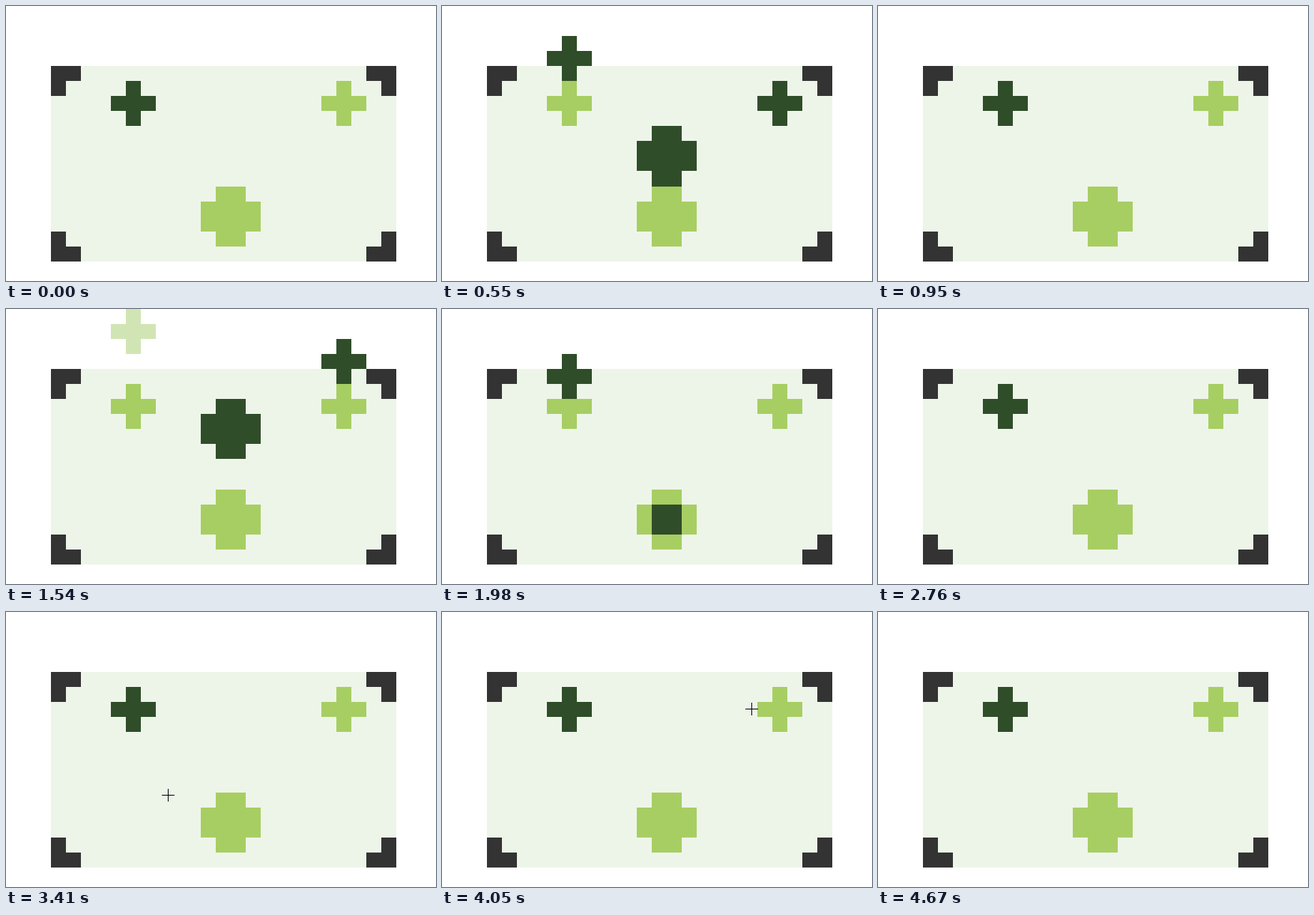
Animation, 574 px wide and 367 px high, one loop 5100 ms. Source, as an HTML page with a canvas:

```html
<!DOCTYPE html>
<html lang="en">
<head>
<meta charset="utf-8">
<title>Floating pluses</title>
<style>
  html, body { margin: 0; width: 100%; height: 100%; overflow: hidden; background: #fff; }
  canvas { display: block; }
</style>
</head>
<body>
<canvas id="stage" width="574" height="367"></canvas>
<script>
const ctx = document.getElementById('stage').getContext('2d');
const LOOP = 5100;
const PANEL = '#edf5e9', CORNER = '#333333';
const DARK = '#304d29', LIGHT = '#a7ce62', PALE = '#d1e5b4';

// Start of each pose, three rounds of eight; every eighth is the rest pose.
const beats = [
  250, 355, 460, 560, 665, 770, 870, 950,
  1120, 1200, 1350, 1450, 1540, 1660, 1750, 1860,
  1980, 2090, 2200, 2310, 2440, 2530, 2670, 2760
];

// Height in cells above home for each pose; null is hidden, 'dot' is the seed.
const sprites = [
  { x: 7, y: 5, size: 3, rise: [0, 2, 3, 3, 3, 5, null, 'dot'], fade: 5 },
  { x: 21, y: 5, size: 3, rise: [null, null, 'dot', 0, 2, 3, 4, null], fade: 6 },
  { x: 13, y: 12, size: 4, rise: [null, 'dot', 0, 4, 5, 6, 7, null], fade: 6 }
];

// Pointer strokes: quadratic curves, advanced in even steps.
const strokes = [
  { from: 3090, to: 3590, steps: 14, lead: 0, pts: [[150, 332], [190, 255], [257, 211]],
    ease: p => p * p * (3 - 2 * p) },
  { from: 3620, to: 4080, steps: 10, lead: 1, pts: [[257, 211], [345, 149], [421, 127]],
    ease: p => 1 - Math.pow(1 - p, 1.3) },
  { from: 4180, to: 4670, steps: 14, lead: 1, pts: [[421, 127], [480, -65], [533, 376]],
    ease: p => p }
];

const gx = i => i * 20 + (i > 17 ? 1 : 0);
const gy = i => i * 20 + (i > 11 ? 1 : 0);

function cells(x, y, w, h, color) {
  ctx.fillStyle = color;
  ctx.fillRect(gx(x), gy(y), gx(x + w) - gx(x), gy(y + h) - gy(y));
}

function plus(x, y, size, color) {
  cells(x + 1, y, size - 2, size, color);
  cells(x, y + 1, size, size - 2, color);
}

function panel() {
  cells(3, 4, 23, 13, PANEL);
  for (const [x, inner] of [[3, 3], [25, 24]]) {
    for (const [y, arm] of [[4, 5], [16, 15]]) {
      cells(inner, y, 2, 1, CORNER);
      cells(x, arm, 1, 1, CORNER);
    }
  }
}

function sprite(s, pose) {
  plus(s.x, s.y, s.size, LIGHT);
  const up = s.rise[pose];
  if (up === null) return;
  if (up === 'dot') cells(s.x + 1, s.y + 1, s.size - 2, s.size - 2, DARK);
  else plus(s.x, s.y - up, s.size, pose === s.fade ? PALE : DARK);
}

function pointer(t) {
  const s = strokes.filter(s => t >= s.from).pop();
  if (!s || t >= strokes[2].to) return;
  const last = s.steps - 1;
  const k = Math.min(last, Math.floor((t - s.from) / (s.to - s.from) * last));
  const u = s.ease((k + s.lead) / (last + s.lead));
  const [a, b, c] = s.pts;
  const [x, y] = [0, 1].map(i => Math.round(
    (1 - u) * (1 - u) * a[i] + 2 * u * (1 - u) * b[i] + u * u * c[i]));
  ctx.fillStyle = '#000';
  ctx.fillRect(x - 8, y, 17, 1);
  ctx.fillRect(x, y - 8, 1, 17);
}

function draw(t) {
  ctx.fillStyle = '#fff';
  ctx.fillRect(0, 0, 574, 367);
  panel();
  const pose = beats.filter(b => b <= t).length % 8;
  sprites.forEach(s => sprite(s, pose));
  pointer(t);
}

const start = performance.now();
function tick() {
  draw((performance.now() - start) % LOOP);
  requestAnimationFrame(tick);
}
tick();
</script>
</body>
</html>
```
